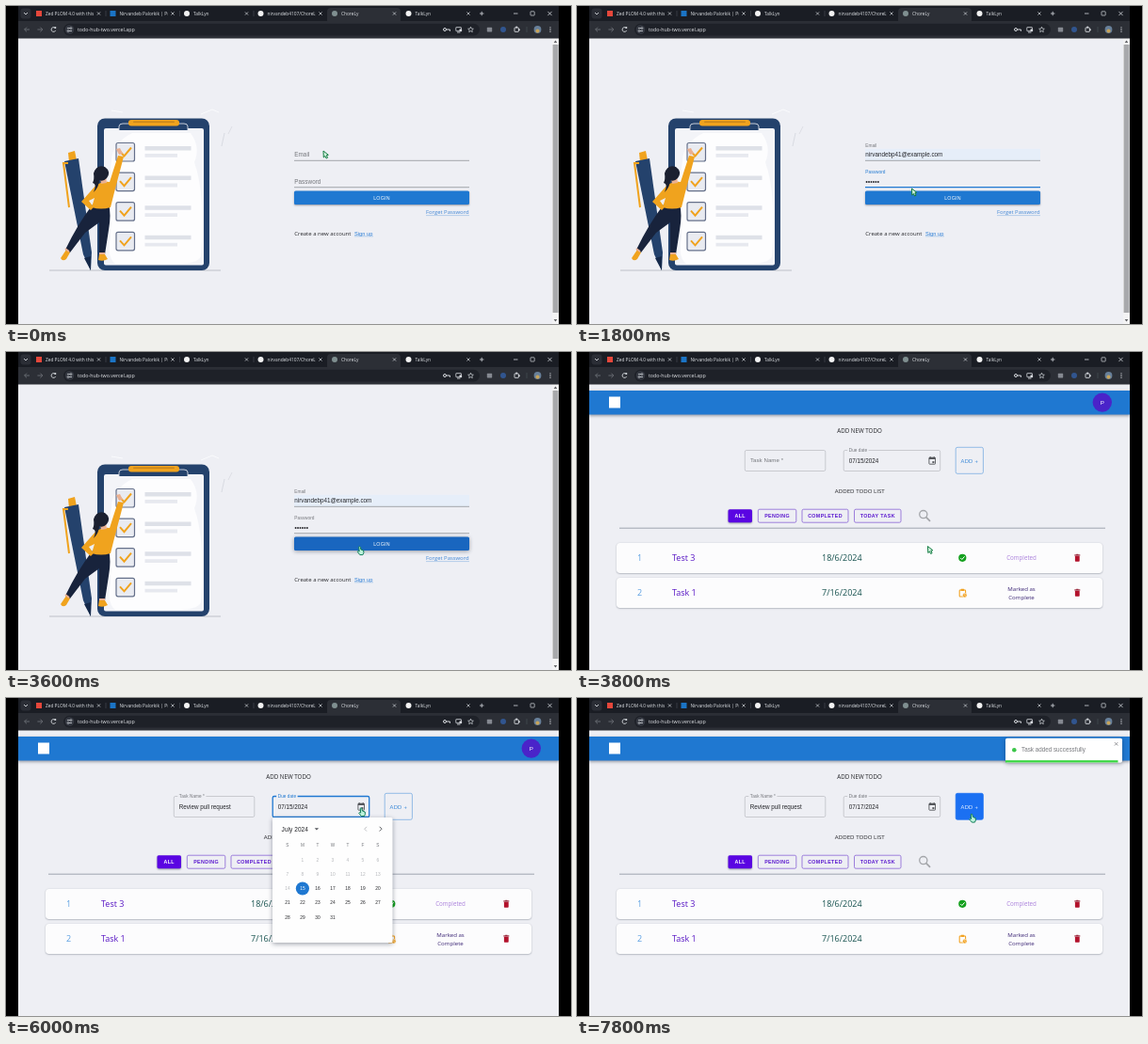
Recreate the animation shown at these times as an HTML page with a canvas. Size 600 px wide and 338 px high, loop 8 s.

```html
<!DOCTYPE html>
<html lang="en">
<head>
<meta charset="utf-8">
<title>Todo app walkthrough</title>
<style>
html, body { margin: 0; width: 100%; height: 100%; overflow: hidden; background: #000; }
canvas { display: block; width: 600px; height: 338px; }
</style>
</head>
<body>
<canvas id="stage"></canvas>
<script>
const W = 600, H = 338, LOOP = 8000, STEP = 200;
const canvas = document.getElementById('stage');
const ctx = canvas.getContext('2d');
const dpr = window.devicePixelRatio || 1;
canvas.width = W * dpr;
canvas.height = H * dpr;

const ARIAL = '"Liberation Sans", Arial, sans-serif';
const SEGOE = '"Open Sans", "Noto Sans", sans-serif';
const BLUE = '#1f78d1', GREY = '#74767b', INK = '#242529', NAVY = '#24426c', ORANGE = '#f0a31e';
const EMAIL = 'nirvandebp41@example.com', TASK = 'Review pull request';

// ---------- drawing helpers ----------
function rect(x, y, w, h, fill, r = 0, stroke, lw = 0.7) {
  ctx.beginPath();
  ctx.roundRect(x, y, w, h, r);
  if (fill) { ctx.fillStyle = fill; ctx.fill(); }
  if (stroke) { ctx.strokeStyle = stroke; ctx.lineWidth = lw; ctx.stroke(); }
}
function disc(x, y, r, fill, stroke, lw = 0.8) {
  ctx.beginPath();
  ctx.arc(x, y, r, 0, Math.PI * 2);
  if (fill) { ctx.fillStyle = fill; ctx.fill(); }
  if (stroke) { ctx.strokeStyle = stroke; ctx.lineWidth = lw; ctx.stroke(); }
}
function line(color, lw, ...p) {
  ctx.beginPath();
  for (let i = 0; i < p.length; i += 2) ctx.lineTo(p[i], p[i + 1]);
  ctx.strokeStyle = color;
  ctx.lineWidth = lw;
  ctx.stroke();
}
function shape(d, fill, stroke, lw = 1) {
  const path = new Path2D(d);
  if (fill) { ctx.fillStyle = fill; ctx.fill(path); }
  if (stroke) { ctx.strokeStyle = stroke; ctx.lineWidth = lw; ctx.stroke(path); }
}
function text(s, x, y, size, color, o = {}) {
  ctx.font = `${o.weight || 400} ${size}px ${o.font || ARIAL}`;
  ctx.letterSpacing = (o.gap || 0) + 'px';
  ctx.textAlign = o.align || 'left';
  ctx.fillStyle = color;
  ctx.fillText(s, x, y);
  return ctx.measureText(s).width;
}
const mid = (s, x, y, size, color, o) => text(s, x, y, size, color, { align: 'center', ...o });
function shadowed(blur, dy, draw) {
  ctx.save();
  ctx.shadowColor = 'rgba(20,30,50,.4)';
  ctx.shadowBlur = blur * dpr;
  ctx.shadowOffsetY = dy * dpr;
  draw();
  ctx.restore();
}

// ---------- browser frame ----------
const TABS = [
  ['Zed PLOM 4.0 with this amazing', '#e5473b', 'square'],
  ['Nirvandeb Palorkik | Profile', '#1b74c5', 'square'],
  ['TalkLyn', '#f2f2f2', 'disc'],
  ['nirvandeb4107/ChoreLy', '#f2f2f2', 'disc'],
  ['ChoreLy', '#7f8f90', 'disc'],
  ['TalkLyn', '#f2f2f2', 'disc']
];
function cross(x, y, r, color, lw) {
  line(color, lw, x - r, y - r, x + r, y + r);
  line(color, lw, x - r, y + r, x + r, y - r);
}
function browser() {
  const pale = '#d5d8dd', dim = '#6d7077';
  rect(13, 0, 574, 17, '#1a1d24');
  rect(13, 16, 574, 18.5, '#2c2f36');
  rect(341, 2, 78, 17, '#2c2f36', 4);
  rect(15.5, 2.5, 11, 11, '#2b2e36', 3);
  line(pale, 0.9, 19, 7, 21, 9, 23, 7);
  TABS.forEach(([name, color, kind], i) => {
    const x = 35 + i * 78.5;
    if (kind === 'disc') disc(x, 8, 3, color);
    else rect(x - 3, 5, 6, 6, color);
    ctx.save();
    ctx.beginPath();
    ctx.rect(x + 6, 0, 52, 16);
    ctx.clip();
    text(name, x + 7, 9.9, 4.8, '#dfe2e6', { font: SEGOE });
    ctx.restore();
    cross(x + 63.5, 8, 1.6, pale, 0.7);
    if (i < 3) line('#4b4f58', 0.6, x + 71, 5, x + 71, 11);
  });
  line(pale, 0.8, 503, 8, 507.4, 8);
  line(pale, 0.8, 505.2, 5.8, 505.2, 10.2);
  line(pale, 0.8, 539, 8, 543.5, 8);
  rect(557, 5.8, 4.2, 4.2, null, 0.5, pale);
  cross(577.5, 8, 2.1, pale, 0.8);

  line(dim, 0.9, 25, 25, 19.6, 25);
  line(dim, 0.9, 22, 22.6, 19.6, 25, 22, 27.4);
  line(dim, 0.9, 33.4, 25, 38.8, 25);
  line(dim, 0.9, 36.4, 22.6, 38.8, 25, 36.4, 27.4);
  ctx.beginPath();
  ctx.arc(50.5, 25, 2.4, 0.4, 5.6);
  ctx.strokeStyle = pale;
  ctx.lineWidth = 0.9;
  ctx.stroke();
  rect(51.4, 22.1, 1.8, 1.8, pale);

  rect(61, 18.8, 442, 12.6, '#1e2128', 6.3);
  disc(67.5, 25, 4.8, '#343841');
  line(pale, 0.8, 65, 23.6, 68, 23.6);
  line(pale, 0.8, 67, 26.5, 70, 26.5);
  disc(69, 23.6, 0.9, null, pale, 0.7);
  disc(66, 26.5, 0.9, null, pale, 0.7);
  text('todo-hub-two.vercel.app', 76, 26.9, 5.3, '#e3e5e9', { font: SEGOE });

  disc(466, 25, 1.5, null, pale, 1);
  line(pale, 1, 467.5, 25, 471.4, 25, 471.4, 26.8);
  rect(477.8, 22.6, 5.6, 4, null, 0.4, pale, 0.8);
  line(pale, 0.9, 479, 28, 482.4, 28);
  rect(481.5, 24.5, 2.6, 2.6, pale);
  ctx.beginPath();
  for (let i = 0; i < 10; i++) {
    const r = i % 2 ? 1.4 : 3, a = i * Math.PI / 5 - Math.PI / 2;
    ctx.lineTo(493.5 + r * Math.cos(a), 25.2 + r * Math.sin(a));
  }
  ctx.closePath();
  ctx.strokeStyle = pale;
  ctx.lineWidth = 0.7;
  ctx.stroke();
  rect(510.8, 22.8, 5.4, 4.6, '#858991', 0.6);
  disc(528, 25, 3, '#31558f');
  rect(540, 23, 4.4, 4.4, null, 0.5, pale, 0.9);
  disc(542.2, 22.6, 1, pale);
  disc(544.9, 25.2, 1, pale);
  line('#50545c', 0.6, 553, 22, 553, 28);
  disc(564.5, 25, 3.9, '#68809a');
  disc(564.5, 26.6, 2, '#c7a45a');
  for (const y of [22.8, 25, 27.2]) disc(578, y, 0.65, pale);
}

// ---------- login page ----------
function checklistArt() {
  line('#a9adb6', 0.7, 46, 281, 228, 281);
  line('#d2d5dc', 0.8, 229, 149, 232, 135);
  line('#d8dae0', 0.8, 236, 136, 240, 128);
  line('#fafbfd', 1, 112, 111, 124, 113);
  line('#fafbfd', 1, 207, 115, 219, 110, 226, 113);

  rect(97, 119.5, 119, 161.5, NAVY, 8);
  rect(104, 130, 106, 145.5, '#f3f4f8', 2);
  shape('M134 135 H196 Q207 150 200 166 Q212 200 207 266 Q204 274 180 274 H116 Q107 268 111 245 Q106 200 112 165 Q112 146 134 135Z', '#fdfdfe');
  shape('M120 132 V128 Q120 125 124 125 H189 Q193 125 193 128 V132', NAVY, '#d7dce5', 0.9);
  rect(130, 121, 54, 6.5, ORANGE, 3);
  rect(135, 122.5, 44, 1.5, '#c9861b', 0.7);

  for (let i = 0; i < 4; i++) {
    const y = 145.5 + i * 31.6;
    rect(117, y, 19.5, 19.5, '#e9ebf1', 2, '#65708a', 1.2);
    line(ORANGE, 2, 121, y + 9, 125.5, y + 14, 133, y + 5);
    rect(147.5, y + 3.5, 49, 4.5, '#dee1e8');
    rect(147.5, y + 11.5, 34.5, 3.8, '#e7e9ef');
  }

  // pen
  shape('M66 156 L73 154 L75 164 L67 166Z', ORANGE);
  shape('M62 165 L77 162 L91 262 L90 281 L82 264Z', NAVY);
  shape('M83 268 L90 266 L90 281Z', '#15294a');
  shape('M66 167 H61 L67 214', null, ORANGE, 2);

  // woman reaching for the first box
  shape('M92 211 L109 210 Q112 222 109 238 L105 264 L99 264 L99 230 L84 241 L68 262 L63 259 Q76 232 92 211Z', '#18233c');
  shape('M64 259 L68 262 L64 269 Q60 272 58 268Z', ORANGE);
  shape('M99 264 H105 L108 269 Q103 272 98 270Z', ORANGE);
  shape('M63 258 L67 261 M99 263 H105', null, '#eab091', 2);
  shape('M120 158 L117 152 L121 151 L124 157Z', '#eab091');
  shape('M96 190 Q103 186 110 187 L119 159 L125 160 L115 198 L111 214 Q101 217 91 214 L94 204 L88 207 L93 214 L90 217 L80 208Z', ORANGE);
  shape('M100 183 L106 181 L107 188 L101 189Z', '#eab091');
  shape('M93 178 Q96 168 105 171 Q112 176 107 183 Q103 187 99 185 Q99 192 93 198 Q97 189 92 188 Q94 184 93 178Z', '#1b2030');
}
function stdField(name, y, s) {
  const lift = s.focus || s.filled;
  if (s.auto) rect(306, y - 12.5, 186, 12.3, '#e6eef9');
  if (lift) text(name, 306.3, y - 14.6, 4.75, s.focus ? BLUE : GREY, { gap: 0.04 });
  else text(name, 306.3, y - 4.2, 6.3, GREY, { gap: 0.06 });
  line(s.focus ? BLUE : '#85878c', s.focus ? 1.2 : 0.7, 306, y, 492, y);
}
function loginPage(t) {
  rect(13, 34, 574, 304, '#eeeff4');
  rect(580, 34, 7, 304, '#f3f3f4');
  rect(580.6, 41, 6, 285, '#a8a9ac');
  shape('M581.7 39 L583.5 36.5 L585.3 39Z M581.7 333 L583.5 335.5 L585.3 333Z', '#606165');
  checklistArt();

  const filled = t >= 800;
  const dots = Math.max(0, Math.min(6, Math.floor((t - 1000) / 100)));
  const pwFocus = t >= 1000 && t < 2600;
  const emFocus = t >= 200 && t < 1000;
  stdField('Email', 164.3, { focus: emFocus, filled, auto: filled });
  if (filled) text(EMAIL, 306.3, 160.2, 6.3, INK);
  else if (emFocus) line(INK, 0.6, 306.6, 154.5, 306.6, 161.5);
  stdField('Password', 192.7, { focus: pwFocus, filled: dots > 0 });
  for (let i = 0; i < dots; i++) disc(307.6 + i * 2.45, 187, 0.95, INK);

  const hover = t >= 2200;
  shadowed(hover ? 4 : 2, 1, () => rect(306, 196.5, 186, 14.5, hover ? '#1966bf' : BLUE, 1.6));
  mid('LOGIN', 399, 205.6, 5.3, '#fff', { gap: 0.25 });
  text('Forget Password', 446, 221.2, 5.9, '#3e84d4', { font: SEGOE });
  line('#7ba9df', 0.5, 446, 222.6, 492, 222.6);
  text('Create a new account', 306.3, 243.6, 6, INK, { font: SEGOE });
  text('Sign up', 370, 243.6, 5.7, '#2b7dd6');
  line('#6da4e0', 0.5, 370, 244.8, 390, 244.8);
}

// ---------- dashboard ----------
function outlined(x, w, name, focus, lift) {
  rect(x, 104.5, w, 22, null, 1.6, focus ? BLUE : '#b9bbc0', focus ? 1.3 : 0.7);
  if (!lift) return text(name, x + 5.6, 117.4, 6.1, GREY, { gap: 0.06 });
  ctx.font = `4.7px ${ARIAL}`;
  ctx.letterSpacing = '0.05px';
  rect(x + 4, 103, ctx.measureText(name).width + 3, 3, '#eeeff4');
  text(name, x + 5.5, 106, 4.7, focus ? BLUE : GREY, { gap: 0.05 });
}
function calendarIcon(x, y) {
  rect(x - 3.3, y - 3, 6.6, 7, null, 0.6, '#55575c', 0.9);
  rect(x - 3.3, y - 3.2, 6.6, 2, '#55575c');
  line('#55575c', 0.9, x - 2, y - 4.2, x - 2, y - 2);
  line('#55575c', 0.9, x + 2, y - 4.2, x + 2, y - 2);
  rect(x + 0.2, y + 0.9, 2, 2, '#55575c');
}
function trash(x, y) {
  rect(x - 2.4, y - 2.2, 4.8, 6, '#b3122c', 0.7);
  rect(x - 3, y - 3.6, 6, 1.1, '#8f1026');
  rect(x - 1.1, y - 4.2, 2.2, 0.9, '#8f1026');
}
function row(y, n, name, date) {
  shadowed(1.5, 0.4, () => rect(42, y, 516, 32, '#fcfcfd', 3.5));
  const seg = { font: SEGOE };
  mid(n, 66.5, y + 19.2, 9, '#5b9fe2', seg);
  text(name, 101, y + 19.2, 9, '#5715c4', seg);
  text(date, 260, y + 19.2, 9, '#17524f', seg);
  trash(531.3, y + 16);
}
function dashboard(t, cur) {
  rect(13, 34, 574, 304, '#eeeff4');
  shadowed(3, 1, () => rect(13, 41, 574, 25.5, BLUE));
  rect(34, 47.5, 12, 12, '#fff');
  disc(557.8, 53.6, 10.2, '#4a24c9');
  mid('P', 557.8, 55.8, 6.2, '#fff');

  mid('ADD NEW TODO', 300, 86.4, 6.2, INK, { font: SEGOE });
  mid('ADDED TODO LIST', 300.3, 149.8, 6.15, INK, { font: SEGOE });

  const typed = TASK.slice(0, Math.max(0, Math.round((t - 4200) / 800 * TASK.length)));
  const taskFocus = t >= 4200 && t < 5600;
  outlined(178.3, 85.5, 'Task Name *', taskFocus, t >= 4200);
  const w = text(typed, 183.8, 117.5, 6.3, INK);
  if (taskFocus) line(INK, 0.6, 184.3 + w, 111.5, 184.3 + w, 118.8);

  const open = t >= 5800 && t < 7400;
  outlined(283.2, 102.5, 'Due date', open, true);
  text(t >= 7400 ? '07/17/2024' : '07/15/2024', 288.8, 117.5, 6.3, INK);
  calendarIcon(377.2, 115.2);

  const addHover = t >= 7600;
  rect(402.2, 101.3, 29.2, 28, addHover ? '#1b70f2' : null, 1.8, addHover ? '#1b70f2' : '#6ba5e0');
  mid('ADD +', 416.8, 117.6, 5.8, addHover ? '#e6f0ff' : '#3a88d8', { gap: 0.25 });

  [['ALL', 160.5, 25.5], ['PENDING', 192.3, 40.5], ['COMPLETED', 239, 49], ['TODAY TASK', 294.5, 49.5]]
    .forEach(([name, x, bw], i) => {
      const draw = () => rect(x, 167.2, bw, 14, i ? null : '#5a05e2', 1.6, i ? '#7a4fd0' : null);
      i ? draw() : shadowed(2, 1, draw);
      mid(name, x + bw / 2, 176.2, 5.35, i ? '#5a17cf' : '#fff', { weight: 700, gap: 0.35 });
    });
  disc(367.8, 172.6, 4.1, null, '#a3a5a9', 1.3);
  line('#a3a5a9', 1.7, 370.8, 175.6, 375, 179.8);
  line('#8b939d', 0.8, 45, 187.2, 561, 187.2);

  row(203, '1', 'Test 3', '18/6/2024');
  disc(409.3, 218.8, 4.1, '#14a01e');
  line('#fff', 1, 407.2, 218.9, 408.8, 220.5, 411.6, 217.3);
  mid('Completed', 472, 221.2, 6.2, '#a97fdb', { font: SEGOE });

  row(240, '2', 'Task 1', '7/16/2024');
  rect(406.2, 253, 6.4, 7, null, 0.7, '#f2a324', 1.1);
  rect(407.6, 251.8, 3.6, 2.2, '#f2a324', 0.6);
  disc(411.8, 258.6, 2.3, '#f2a324', '#fcfcfd', 0.5);
  line('#fff', 0.6, 411.8, 257.3, 411.8, 258.7, 412.7, 259.3);
  mid('Marked as', 472, 254.2, 6.1, '#3a2474', { font: SEGOE });
  mid('Complete', 472, 263.4, 6.1, '#3a2474', { font: SEGOE });

  if (open) picker(cur);
  if (t >= 7800) toast();
}
function picker(cur) {
  shadowed(5, 1.5, () => rect(283, 127, 127.5, 133, '#fefefe', 1.5));
  text('July 2024', 292.6, 141.6, 6.5, INK, { gap: 0.06 });
  shape('M327.7 138.2 H332.1 L329.9 140.6Z', '#55575c');
  line('#b9bbbf', 0.9, 383, 136.8, 380.7, 139.2, 383, 141.6);
  line('#4a4c51', 0.9, 396.7, 136.8, 399, 139.2, 396.7, 141.6);
  [...'SMTWTFS'].forEach((d, i) => mid(d, 298.9 + i * 16, 158, 4.7, '#75777c'));
  for (let d = 1; d <= 31; d++) {
    const x = 298.9 + d % 7 * 16, y = 172.2 + Math.floor(d / 7) * 15.15;
    const chosen = d === 15;
    if (chosen) disc(x, y, 7.1, BLUE);
    else if (d > 15 && Math.hypot(cur.x - x, cur.y - y) < 7) disc(x, y, 7.1, '#e8edf3');
    mid(d, x, y + 1.7, 4.8, chosen ? '#fff' : d < 15 ? '#b4b6ba' : INK);
  }
}
function toast() {
  shadowed(4, 1, () => rect(455, 42.8, 124, 26, '#fff', 1.8));
  rect(455, 66.2, 119.5, 2.2, '#35d53d');
  disc(464.3, 55.2, 2.3, '#3cc64a');
  text('Task added successfully', 472, 57.4, 6.3, '#77797d');
  cross(572.6, 48.8, 1.7, '#7c7e83', 0.8);
}

// ---------- pointer ----------
const PATH = [
  [0, 337, 154], [400, 338, 156], [800, 345, 170], [1000, 346, 186], [1400, 348, 187],
  [1800, 355.5, 194], [2400, 375, 207], [3600, 375, 207], [3800, 372.5, 206.5],
  [4200, 225, 117], [4600, 215, 126], [5000, 215, 126], [5600, 376.5, 115],
  [6000, 376.5, 117], [6800, 348.3, 205], [7200, 348.3, 205], [7600, 418.5, 123.5], [8000, 418.5, 123.5]
];
function pointerAt(t) {
  const i = PATH.findIndex(p => p[0] > t);
  const [t0, x0, y0] = PATH[i - 1], [t1, x1, y1] = PATH[i];
  const k = (t - t0) / (t1 - t0), e = k * k * (3 - 2 * k);
  return { x: x0 + (x1 - x0) * e, y: y0 + (y1 - y0) * e };
}
function pointerKind(t) {
  if (t >= 4200 && t < 5400) return 'beam';
  if (t >= 2200 && t < 3800 || t >= 5600 && t < 6200 || t >= 6400 && t < 7400 || t >= 7600) return 'hand';
  return 'arrow';
}
function pointer(kind, { x, y }) {
  ctx.save();
  ctx.translate(x, y);
  if (kind === 'beam') {
    line('#26383a', 0.9, 0, -3.2, 0, 3.2);
    line('#26383a', 0.9, -2, -3.4, 2, -3.4);
    line('#26383a', 0.9, -2, 3.4, 2, 3.4);
  } else if (kind === 'hand') {
    shape('M-.3 .2 Q.7 -.8 1.4 .4 L1.9 3 L4.7 4 Q5.5 6.8 3.9 8.6 H.8 Q-.6 6.8 -1.8 5.3 Q-1.3 4 .2 5Z', '#bdf2dc', '#117e59', 1);
  } else {
    shape('M0 0 L.3 7 L1.9 5.5 L3.2 8 L4.6 7.2 L3.3 4.8 L5.3 4.3Z', '#d2f3df', '#117a40', 1);
  }
  ctx.restore();
}

function draw(now) {
  const t = Math.floor(now % LOOP / STEP) * STEP;
  const cur = pointerAt(t);
  ctx.setTransform(dpr, 0, 0, dpr, 0, 0);
  rect(0, 0, W, H, '#000');
  ctx.save();
  ctx.beginPath();
  ctx.rect(13, 0, 574, H);
  ctx.clip();
  if (t < 3800) loginPage(t);
  else dashboard(t, cur);
  browser();
  pointer(pointerKind(t), cur);
  ctx.restore();
}
let start;
function tick(now) {
  start ??= now;
  draw(now - start);
  requestAnimationFrame(tick);
}
draw(0);
requestAnimationFrame(tick);
</script>
</body>
</html>
```
